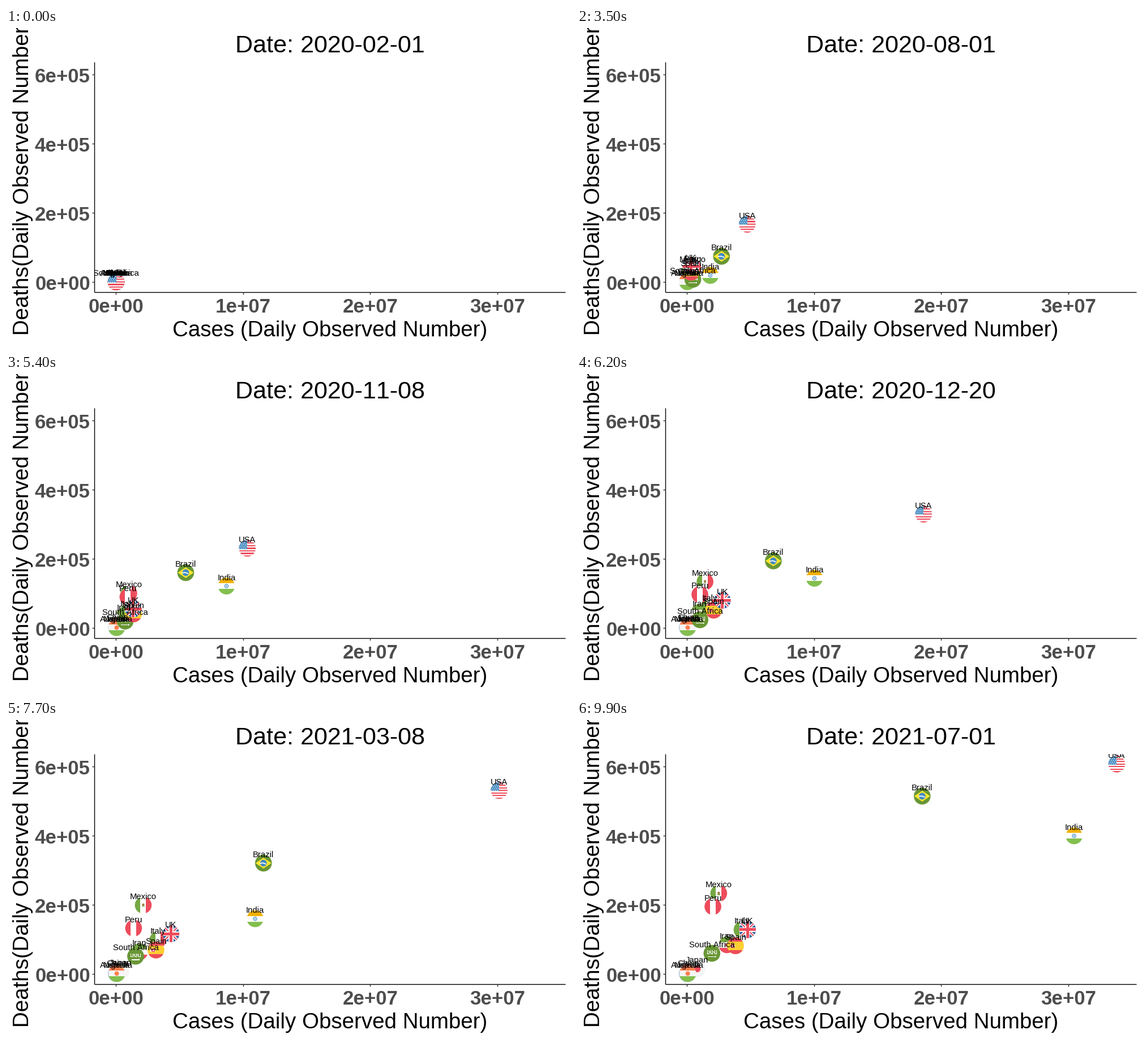
A matplotlib script that plays this animation: 998x561 px, repeating every 10 s.

```python
import matplotlib.pyplot as plt
import numpy as np
from matplotlib.animation import FuncAnimation
from matplotlib.patches import Circle, Polygon, Rectangle, Wedge
from matplotlib.path import Path
from matplotlib.transforms import Affine2D

W, H, DPI = 998, 561, 100
FRAMES, DAYS, MONTHS = 100, 516, 17
START = np.datetime64("2020-02-01")
X0, PX_PER_M = 194.5, 22.44     # cases, millions
Y0, PX_PER_K = 447.9, 0.61      # deaths, thousands
LEFT, TOP, RIGHT, BOTTOM = 156.5, 60, 988.3, 466.4
RADIUS = 14.8

RED, WHITE, BLUE, NAVY = "#ed4c5c", "#ffffff", "#428bc1", "#2a5f9e"
GREEN, OLIVE, LIME = "#75a843", "#699635", "#83bf4f"
YELLOW, GOLD, AMBER, ORANGE = "#ffe62e", "#ffce31", "#f2b200", "#ff7f50"
PALE, BROWN = "#f5f5f5", "#a08050"

plt.rcParams["font.family"] = "Liberation Sans"
plt.rcParams["text.kerning_factor"] = 6     # no pair kerning
fig = plt.figure(figsize=(W / DPI, H / DPI), dpi=DPI, facecolor="white")
ax = fig.add_axes([0, 0, 1, 1])
ax.set(xlim=(0, W), ylim=(H, 0))
ax.axis("off")
panel = ax.add_patch(Rectangle((LEFT, TOP), RIGHT - LEFT, BOTTOM - TOP,
                               fc="white", lw=0))


def text(x, y, s, px, **kw):
    return ax.text(x, y, s, fontsize=px * 72 / DPI,
                   **{"ha": "center", "va": "baseline", **kw})


def line(xs, ys, color="black"):
    ax.plot(xs, ys, color=color, lw=1.02, solid_capstyle="butt")


# Flag parts live in a unit disc with y pointing down.
def box(x0, y0, x1, y1, color):
    return Rectangle((x0, y0), x1 - x0, y1 - y0, fc=color, lw=0)


def disc(x, y, r, color):
    return Circle((x, y), r, fc=color, lw=0)


def fill(color):
    return box(-1.1, -1.1, 1.1, 1.1, color)


def bar(angle, width, color, dx=0.0, dy=0.0, length=2.4):
    a = np.radians(angle)
    u = np.array([np.cos(a), np.sin(a)]) * length / 2
    v = np.array([-np.sin(a), np.cos(a)]) * width / 2
    pts = np.array([u + v, u - v, -u - v, -u + v]) + [dx, dy]
    return Polygon(pts, fc=color, lw=0)


def rows(top, mid, low, edge=1 / 3):
    return [fill(mid), box(-1.1, -1.1, 1.1, -edge, top),
            box(-1.1, edge, 1.1, 1.1, low)]


def columns(left, mid, right, edge=1 / 3):
    return [fill(mid), box(-1.1, -1.1, -edge, 1.1, left),
            box(edge, -1.1, 1.1, 1.1, right)]


def usa():
    h = 2 / 13
    parts = [fill(WHITE)]
    parts += [box(-1.1, -1 + 2 * i * h, 1.1, -1 + (2 * i + 1) * h, RED)
              for i in range(7)]
    parts.append(box(-1.1, -1.1, 0, 1 / 13, BLUE))
    parts += [disc(-0.9 + 0.24 * i + 0.12 * (j % 2), -0.86 + 0.21 * j,
                   0.055, WHITE) for j in range(5) for i in range(4)]
    return parts


def brazil():
    rhomb = Polygon([(-0.95, 0), (0, -0.64), (0.95, 0), (0, 0.64)],
                    fc=YELLOW, lw=0)
    arc = Wedge((-0.15, 0.75), 0.82, 247, 307, width=0.12, fc=WHITE, lw=0)
    return [fill(OLIVE), rhomb, disc(0, 0, 0.4, BLUE), arc]


def india():
    return rows(AMBER, WHITE, LIME) + [disc(0, 0, 0.25, BLUE),
                                       disc(0, 0, 0.17, WHITE),
                                       disc(0, 0, 0.08, BLUE)]


def mexico():
    return columns(GREEN, WHITE, RED) + [disc(0, -0.05, 0.15, BROWN),
                                         bar(0, 0.08, GREEN, 0, 0.15, 0.3)]


def iran():
    return rows(GREEN, WHITE, RED) + [disc(0, 0, 0.2, RED),
                                      disc(0, -0.05, 0.09, WHITE)]


def spain():
    pillars = [bar(90, 0.07, PALE, x, 0.05, 0.4) for x in (-0.6, -0.08)]
    return rows(RED, GOLD, RED, 0.5) + pillars + [
        box(-0.52, -0.2, -0.16, 0.24, RED), box(-0.4, -0.05, -0.28, 0.15, PALE)]


def uk():
    parts = [fill(NAVY)]
    for width, color in ((0.36, WHITE), (0.14, RED)):
        parts += [bar(45, width, color), bar(-45, width, color)]
    for width, color in ((0.56, WHITE), (0.34, RED)):
        parts += [bar(0, width, color), bar(90, width, color)]
    return parts


def saudi():
    parts = [fill(OLIVE), bar(0, 0.08, WHITE, 0, 0.42, 1.0),
             bar(90, 0.07, WHITE, 0.4, 0.42, 0.2)]
    parts += [bar(90, 0.07, WHITE, x, -0.14, 0.42)
              for x in np.linspace(-0.55, 0.55, 6)]
    parts += [bar(20, 0.07, WHITE, x, 0.05 - 0.2 * (i % 2), 0.3)
              for i, x in enumerate(np.linspace(-0.45, 0.45, 5))]
    return parts


def australia():
    cross = [bar(a, 0.12, WHITE, -0.45, -0.45, 1) for a in (0, 90)]
    stars = [disc(0.5, y, 0.09, WHITE) for y in (-0.4, 0.5)]
    return [fill(NAVY), disc(-0.4, 0.45, 0.14, WHITE)] + cross + stars


def china():
    return [fill(RED), disc(-0.4, -0.2, 0.25, YELLOW)]


def japan():
    return [fill(PALE), disc(0, 0, 0.42, RED)]


def niger():
    return rows(ORANGE, PALE, LIME) + [disc(0, 0, 0.27, ORANGE)]


class Country:
    """A round flag with a label, pushed along by epidemic waves.

    Each wave is a Gompertz curve: (peak month, width, cases M, deaths k).
    Deaths trail cases by `lag` months.
    """

    def __init__(self, name, parts, lag, *waves):
        self.lag, self.waves = lag, waves
        self.move = Affine2D()
        trans = self.move + ax.transData
        for part in parts:
            part.set_transform(trans)
            part.set_clip_path(Path.unit_circle(), trans)
            ax.add_patch(part)
        self.label = text(0, 0, name, 14.7, clip_on=True)
        self.label.set_clip_path(panel)

    def update(self, month):
        cases = deaths = 0
        for peak, width, c, d in self.waves:
            z = (month - peak) / width
            cases += c * np.exp(-np.exp(-z))
            deaths += d * np.exp(-np.exp(self.lag / width - z))
        x, y = X0 + PX_PER_M * cases, Y0 - PX_PER_K * deaths
        self.move.clear().scale(RADIUS).translate(x, y)
        self.label.set_position((x, y - 10.6))


# axes
line([LEFT, LEFT], [TOP, BOTTOM])
line([LEFT, RIGHT], [BOTTOM, BOTTOM])
tick = dict(color="#4d4d4d", weight="bold")
for n in range(4):
    x, y = X0 + 10 * n * PX_PER_M, Y0 - 200 * n * PX_PER_K
    line([x, x], [BOTTOM, BOTTOM + 4], "#333333")
    line([LEFT - 4, LEFT], [y, y], "#333333")
    text(x, 501.5, f"{n}e+0{7 if n else 0}", 34.9, **tick)
    text(148.8, y + 13.8, f"{2 * n}e+0{5 if n else 0}", 34.9, ha="right", **tick)
text(572.3, 544, "Cases (Daily Observed Number)", 38.5)
text(40, 263, "Deaths(Daily Observed Number)", 38.5,
     rotation=90, rotation_mode="anchor")
title = text(572.3, 42.8, "", 43.1)

# drawn in alphabetical order, later ones on top
countries = [
    Country("Australia", australia(), 0, (2, .3, .03, .9)),
    Country("Brazil", brazil(), .2, (5.6, 1.8, 6, 180), (13.4, 2.8, 16.5, 450)),
    Country("China", china(), 0, (.3, .3, .09, 4.6)),
    Country("India", india(), .3, (7, 1.66, 11.2, 164), (14.9, .75, 20.5, 258)),
    Country("Iran", iran(), 0, (8, 2.4, 1, 58), (14, 3.5, 3.3, 42)),
    Country("Italy", columns(GREEN, WHITE, RED), .6,
            (2, .6, .24, 35), (10.8, 2.4, 4.4, 102)),
    Country("Japan", japan(), 0, (14, 3.6, 1.22, 23)),
    Country("Mexico", mexico(), .3, (5.8, 2, 1.05, 115), (11, 1.85, 1.5, 124)),
    Country("Nigeria", niger(), 0, (6, 2, .05, 1)),
    Country("Peru", columns(RED, WHITE, RED), 0,
            (5.8, 1.65, 1.05, 101), (13.6, 1.85, 1.15, 110)),
    Country("South Africa", saudi(), .6,
            (5.4, .8, .72, 20), (10.7, .8, .85, 34), (16.4, .6, .55, 15)),
    Country("Spain", spain(), .6, (2, .6, .25, 28), (9.8, 2.65, 3.8, 58)),
    Country("UK", uk(), .6, (2.3, .6, .3, 45), (9.85, 1.55, 4.5, 84)),
    Country("USA", usa(), .6,
            (2.5, .5, 1.2, 125), (5.1, 1.5, 6.1, 95), (10.4, 1.55, 26.9, 395)),
]


def update(k):
    progress = k / (FRAMES - 1)
    title.set_text(f"Date: {START + k * DAYS // (FRAMES - 1)}")
    for country in countries:
        country.update(MONTHS * progress)


anim = FuncAnimation(fig, update, frames=FRAMES, interval=100, repeat=True,
                     repeat_delay=0, cache_frame_data=False)
plt.show()
```
